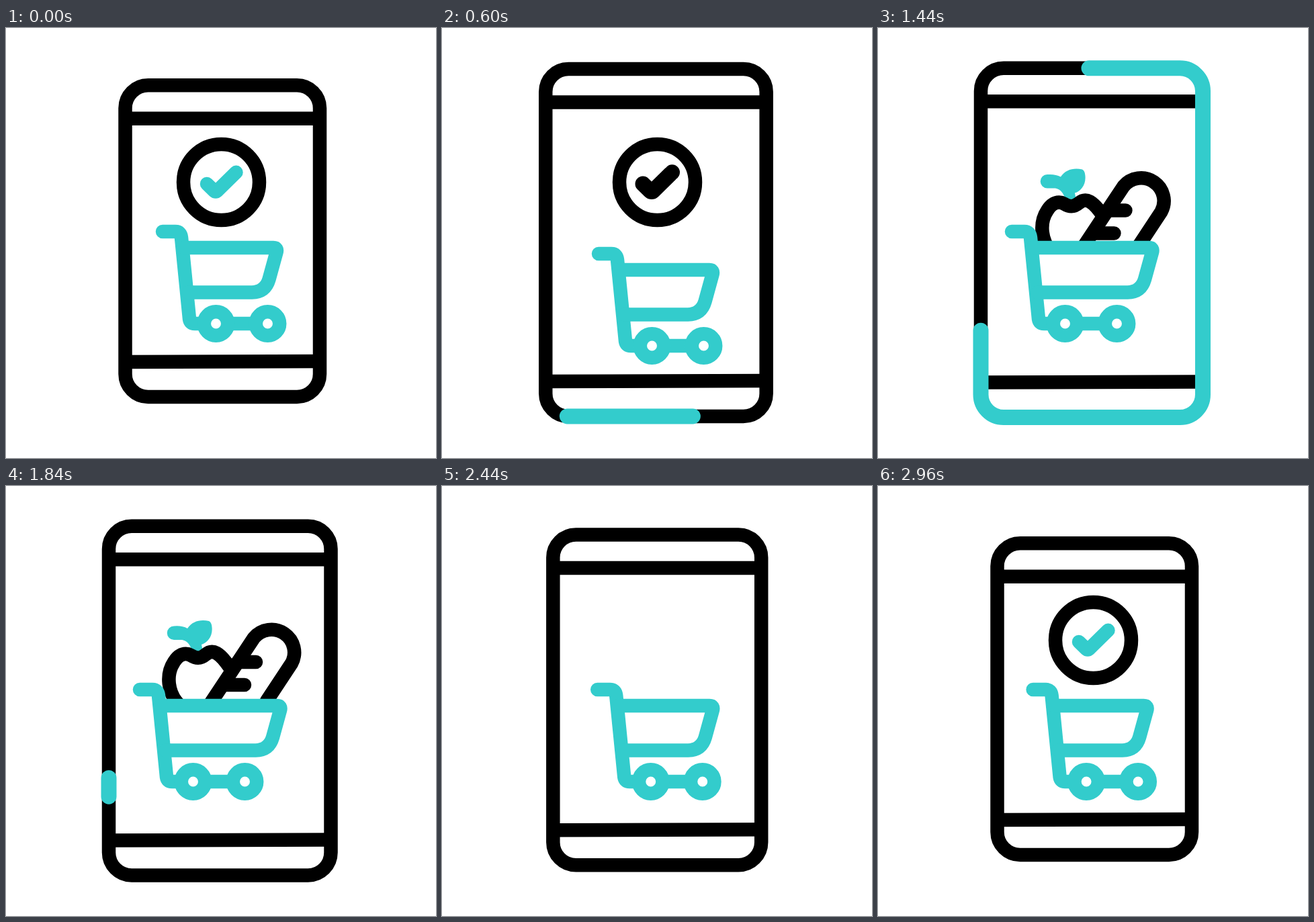
Write an HTML page that moves like this. It is 640x640 px and loops after 3 s.

```html
<!DOCTYPE html>
<html lang="en">
<head>
<meta charset="utf-8">
<title>Mobile shopping</title>
<style>
  html, body { margin: 0; width: 100%; height: 100%; overflow: hidden; background: #fff; }
  svg { display: block; width: 100%; height: 100%; }
  path, circle { fill: none; stroke-width: 20.5; stroke-linecap: round; stroke-linejoin: round; }
  .ink { stroke: #000; }
  .teal { stroke: #3cc; }
  .bold { stroke-width: 23; }
  .white { fill: #fff; }
</style>
</head>
<body>
<svg viewBox="0 0 640 640">
  <defs>
    <clipPath id="screen"><path id="screenShape"/></clipPath>
    <clipPath id="aboveBasket"><rect x="100" y="100" width="440" height="227"/></clipPath>
  </defs>
  <g clip-path="url(#screen)">
    <g id="badge">
      <circle class="ink" cx="320.5" cy="229.5" r="56.5"/>
      <path class="teal" d="M299 232L310 242.7Q312 244.5 314 242.7L342.5 214.8"/>
      <path id="tick" class="ink bold" pathLength="1" d="M299 232L310 242.7Q312 244.5 314 242.7L342.5 214.8"/>
    </g>
    <g id="strip">
      <g id="food" clip-path="url(#aboveBasket)">
        <g id="apple">
          <path style="fill:#3cc" d="M270 212C277 201 290 198 302 201Q306 203 306.5 210C308 224 300 233 291 236L293 246Q286 250 277 246Q273 231 262 229H250A10.2 10.2 0 0 1 250 208.5Q262 207.5 270 212Z"/>
          <path class="ink white" d="M258 326C240 308 238 280 250 262C258 249 268 248 275 252C283 257 290 257 297 251C308 242 318 248 333 270"/>
        </g>
        <g id="bread" class="ink">
          <path class="white" d="M302 327L369 226A34 34 0 0 1 425 264L388 320"/>
          <path d="M345 262H372M328 296H355"/>
        </g>
      </g>
      <g id="cart" class="teal">
        <path d="M233 303H252Q260 303 261 312L273 433Q274 440 281 440H390"/>
        <path id="basket"/>
        <circle class="white" cx="312.5" cy="440" r="17.7"/>
        <circle class="white" cx="389.5" cy="440" r="17.7"/>
      </g>
      <use href="#cart" x="367"/>
    </g>
  </g>
  <path id="bars" class="ink" style="stroke-linecap:butt"/>
  <path id="body" class="ink"/>
  <path id="runner" class="teal bold" pathLength="1"/>
</svg>
<script>
const LOOP = 3000;
const el = {};
document.querySelectorAll('[id]').forEach(node => el[node.id] = node);

const set = (node, attr, value) => node.setAttribute(attr, value);
const move = (node, x, y = 0) => set(node, 'transform', `translate(${x} ${y})`);

// Eased 0..1 progress between two times.
function ease(t, from, to) {
  const u = Math.min(1, Math.max(0, (t - from) / (to - from)));
  return u * u * (3 - 2 * u);
}

// Shows the part of a unit-length path that begins at start.
function trim(path, start, length) {
  set(path, 'visibility', length > 0.001 ? 'visible' : 'hidden');
  const full = length > 0.999;
  set(path, 'stroke-dasharray', full ? 'none' : `${length} ${1 - length}`);
  set(path, 'stroke-dashoffset', -start);
}

// Clockwise rounded rectangle that begins at the right end of its bottom edge.
function roundRect(l, t, r, b, q) {
  const arc = (x, y) => `A${q} ${q} 0 0 1 ${x} ${y}`;
  return `M${r - q} ${b}H${l + q}${arc(l, b - q)}V${t + q}${arc(l + q, t)}` +
    `H${r - q}${arc(r, t + q)}V${b - q}${arc(r - q, b)}Z`;
}

function drawPhone(t) {
  const grow = ease(t, 100, 680) - ease(t, 2160, 2720);
  const left = 177.5 - 24.5 * grow, right = 467 + 16.5 * grow;
  const top = 85.2 - 25.4 * grow, bottom = 549 + 30.5 * grow;
  const outline = roundRect(left, top, right, bottom, 34);
  for (const id of ['screenShape', 'body', 'runner']) set(el[id], 'd', outline);
  set(el.bars, 'd', `M${left} ${top + 49.5}H${right}M${left} ${bottom - 52}L${right} ${bottom - 53}`);

  const turn = 0.267 * ease(t, 200, 1600) - 0.007;
  const tail = ease(t, 1158, 1898), head = ease(t, 430, 1241);
  trim(el.runner, turn + tail, head - tail);
}

function drawBadge(t) {
  const x = t < 1800
    ? 231 * ease(t, 840, 1320)
    : -230 + 244 * ease(t, 2390, 2760) - 14 * ease(t, 2760, 2940);
  move(el.badge, x);
  trim(el.tick, 0, t < 1800 ? ease(t, 200, 676) : 0);
}

function drawCart(t) {
  const load = ease(t, 870, 1350) - ease(t, 2260, 2470);
  const drop = 33 * (ease(t, 100, 560) - ease(t, 900, 1380));
  const slide = -383 * ease(t, 2468, 2840) + 16 * ease(t, 2840, 3000);
  const g = 39.5 * load;
  move(el.strip, slide - 34 * load, drop);
  set(el.basket, 'd', `M264 327H${398 + g}Q${404.5 + g} 327 ${402.5 + g} 334` +
    `L${391.5 + g} 374Q${386 + g} 393 ${366 + g} 393.5H271`);

  const sunk = 130 * (1 - ease(t, 1120, 1505) + ease(t, 2240, 2470));
  move(el.food, 34);
  move(el.apple, 0.2 * sunk, sunk);
  move(el.bread, -0.37 * sunk, sunk);
  set(el.food, 'visibility', sunk < 130 ? 'visible' : 'hidden');
}

function draw(t) {
  drawPhone(t);
  drawBadge(t);
  drawCart(t);
}

const began = performance.now();
function frame() {
  draw((performance.now() - began) % LOOP);
  requestAnimationFrame(frame);
}
frame();
</script>
</body>
</html>
```
